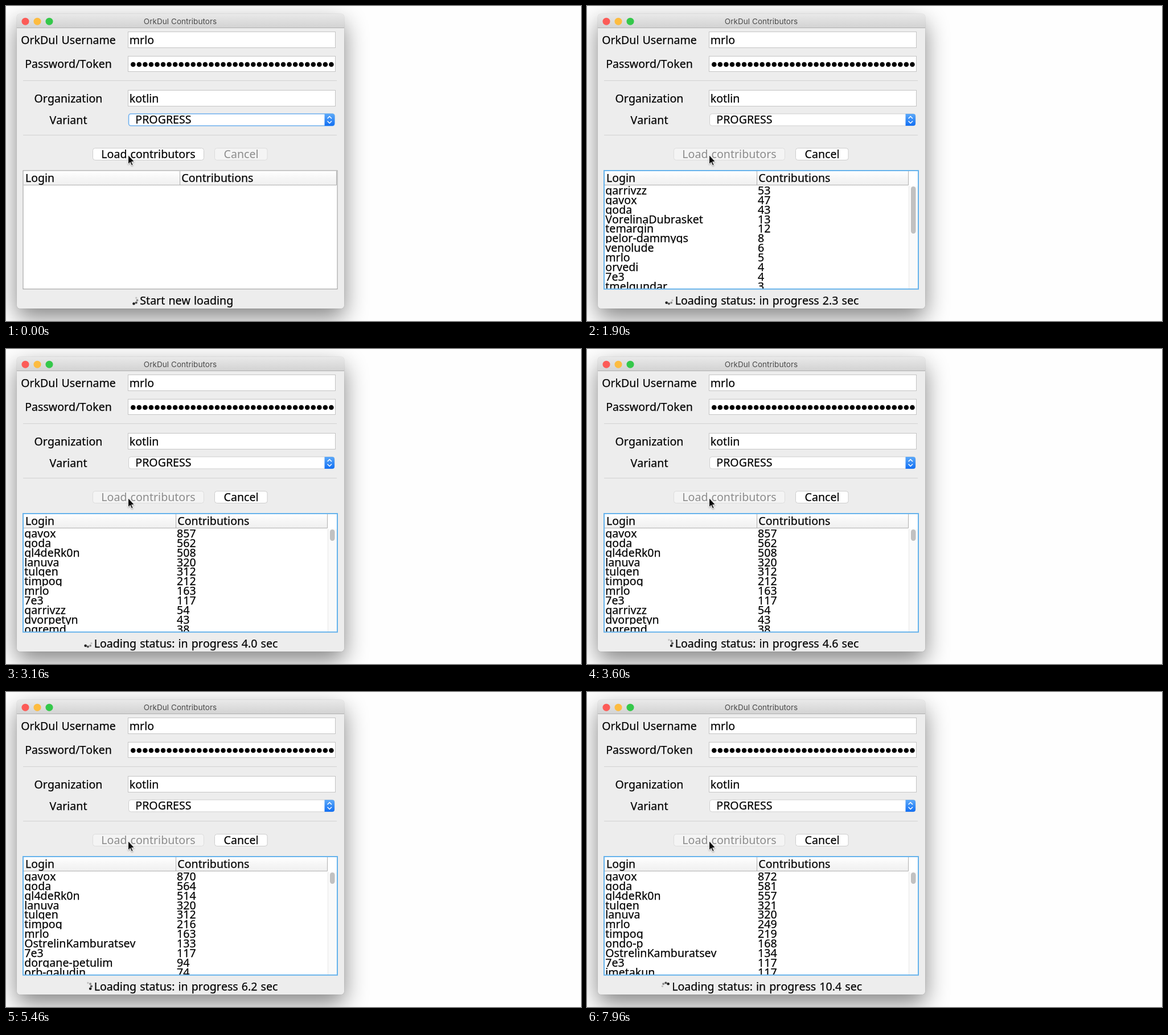
These frames come from a looping animation (1010x555 px, 8000 ms). An HTML page:

```html
<!DOCTYPE html>
<html lang="en">
<head>
<meta charset="utf-8">
<title>Contributors</title>
<style>
  html, body { margin: 0; width: 100%; height: 100%; overflow: hidden; background: #fefefe; }
  .shadow { position: absolute; left: 19px; top: 14px; width: 575px; height: 519px; border-radius: 6px;
    box-shadow: 0 16px 40px rgba(0,0,0,.48), 0 0 1px rgba(0,0,0,.45); }
  #stage { position: absolute; left: 0; top: 0; display: block; }
  text { font: 19.6px "Noto Sans", sans-serif; font-kerning: none; word-spacing: 1px; white-space: pre;
    fill: #050505; stroke: #050505; stroke-width: .25px; }
  .mid { text-anchor: middle; }
  .title { font: 13.6px Inter, sans-serif; word-spacing: 0; fill: #4b4b4b; stroke: none; }
  .field { fill: #fff; stroke: #c4c4c4; }
  .rule { stroke: #d2d2d2; }
  .edge { stroke: #b0b0b0; }
  .btn rect { fill: #fff; stroke: #cdcdcd; }
  .btn.off rect { fill: #f4f4f4; stroke: #dcdcdc; }
  .btn.off text { fill: #8c8c8c; stroke: none; }
  .btn.down rect { fill: url(#press); stroke: #2a70d8; }
  .btn.down text { fill: #fff; stroke: none; }
  .cursor { fill: #0a0a0a; stroke: #fff; filter: drop-shadow(0 1px 1px rgba(0,0,0,.35)); }
</style>
</head>
<body>
<div class="shadow"></div>
<svg id="stage" width="1010" height="555" viewBox="0 0 1010 555">
  <defs>
    <linearGradient id="bar" x2="0" y2="1"><stop stop-color="#e9e9e9"/><stop offset="1" stop-color="#d2d2d2"/></linearGradient>
    <linearGradient id="head" x2="0" y2="1"><stop stop-color="#fff"/><stop offset=".5" stop-color="#f6f6f6"/><stop offset="1" stop-color="#efefef"/></linearGradient>
    <linearGradient id="blue" x2="0" y2="1"><stop stop-color="#5ca9f9"/><stop offset="1" stop-color="#126ff3"/></linearGradient>
    <linearGradient id="press" x2="0" y2="1"><stop stop-color="#4c9bf8"/><stop offset="1" stop-color="#0c62e6"/></linearGradient>
  </defs>

  <rect x="19" y="14" width="575" height="519" rx="6" fill="#ededed"/>
  <path d="M19 39V20a6 6 0 0 1 6-6H588a6 6 0 0 1 6 6V39Z" fill="url(#bar)"/>
  <path class="edge" d="M19 38.5H594"/>
  <circle cx="34" cy="27.2" r="6.5" fill="#fc5b57"/>
  <circle cx="55" cy="27.2" r="6.5" fill="#fdbc40"/>
  <circle cx="76" cy="27.2" r="6.5" fill="#34c84a"/>
  <text class="title mid" x="306" y="32.3">OrkDul Contributors</text>

  <text class="mid" x="109.5" y="67">OrkDul Username</text>
  <text class="mid" x="109.5" y="109.3">Password/Token</text>
  <text class="mid" x="109.5" y="170">Organization</text>
  <text class="mid" x="109.5" y="208">Variant</text>
  <rect class="field" x="214.5" y="45.5" width="364" height="28"/>
  <rect class="field" x="214.5" y="88.5" width="364" height="27"/>
  <rect class="field" x="214.5" y="148.5" width="364" height="28"/>
  <text x="216.8" y="67">mrlo</text>
  <path d="M223.3 103H572" stroke="#000" stroke-width="8.6" stroke-linecap="round" stroke-dasharray="0 10.55"/>
  <text x="216.8" y="170">kotlin</text>
  <path class="rule" d="M30 131.5H581M30 227.5H581"/>

  <rect id="combo" x="215.5" y="190" width="361.5" height="21" rx="4" fill="#fff"/>
  <path d="M559.5 190H573a4 4 0 0 1 4 4V207a4 4 0 0 1-4 4H559.5Z" fill="url(#blue)"/>
  <path d="M564.6 198.3l3.7-3.8 3.7 3.8M564.6 202.7l3.7 3.8 3.7-3.8" fill="none" stroke="#fff" stroke-width="1.5"/>
  <text x="227.3" y="207">PROGRESS</text>

  <g id="load"><rect x="152.5" y="250.5" width="195" height="21" rx="4"/><text class="mid" x="250" y="268.3">Load contributors</text></g>
  <g id="cancel"><rect x="366.5" y="250.5" width="92.5" height="21" rx="4"/><text class="mid" x="413" y="268.3">Cancel</text></g>

  <rect x="30" y="290" width="552" height="208" fill="#fff"/>
  <rect id="header" x="31" y="291" height="25" fill="url(#head)"/>
  <path id="lines" class="edge" fill="none"/>
  <text x="33.9" y="310.3">Login</text>
  <text id="second" y="310.3">Contributions</text>
  <svg id="rows" x="31" y="316.8" width="534" height="181.2"></svg>
  <g id="scroll">
    <rect x="565" y="317" width="16" height="181" fill="#fafafa"/>
    <path d="M565.5 317V498" stroke="#e6e6e6"/>
    <rect id="thumb" x="569" y="318" width="8.5" rx="4.2" fill="#c1c1c1"/>
  </g>
  <rect id="frame" x="30" y="290" width="552" height="208.7" fill="none"/>

  <g id="spin"></g>
  <text id="status" y="525.5"></text>
  <path class="cursor" d="M214.5 262.5V278.8L218.2 275.4 220.8 281.2 223.2 280.1 220.7 274.5H225.6Z"/>
</svg>
<script>
const LOOP = 8000, PRESS = 30, START = 800, FILL = 1690, ROW = 16.87;
const $ = id => document.getElementById(id);

function add(parent, tag, attrs) {
  const el = document.createElementNS('http://www.w3.org/2000/svg', tag);
  return set(parent.appendChild(el), attrs);
}
function set(el, attrs) {
  for (const key in attrs) el.setAttribute(key, attrs[key]);
  return el;
}

// Ranking as it grows while repositories load
const first = 'garrivzz 53 gavox 47 goda 43 VorelinaDubrasket 13 temargin 12 pelor-dammygs 8 venolude 6 mrlo 5 orvedi 4 7e3 4 tmelgundar 3';
const second = 'tulgen 312 mrlo 163 garrivzz 53 gavox 47 goda 46 ogremd 38 VorelinaDubrasket 14 temargin 12 mulpeken 9 pelor-dammygs 8 venolude 6';
const third = 'gavox 857 goda 562 gl4deRk0n 508 lanuva 320 tulgen 312 timpog 212 mrlo 163 7e3 117 garrivzz 54 dvorpetyn 43 ogremd 38';
const fourth = 'gavox 870 goda 564 gl4deRk0n 514 lanuva 320 tulgen 312 timpog 216 mrlo 163 OstrelinKamburatsev 133 7e3 117 dorgane-petulim 94 orb-galudin 74';
const fifth = 'gavox 870 goda 564 gl4deRk0n 554 lanuva 320 tulgen 312 mrlo 249 timpog 219 OstrelinKamburatsev 133 7e3 117 dorgane-petulim 94 orb-galudin 74';
const sixth = 'gavox 872 goda 581 gl4deRk0n 557 tulgen 321 lanuva 320 mrlo 249 timpog 219 ondo-p 168 OstrelinKamburatsev 134 7e3 117 imetakun 117';
// start time, rows, scroll thumb height
const tables = [
  [FILL, first, 83],
  [2200, second, 27],
  [2950, third, 20],
  [3850, third.replace('857', '870'), 20],
  [4600, fourth.replace('514', '508'), 20],
  [5250, fourth, 20],
  [6400, fifth, 20],
  [7300, fifth.replace('870', '872'), 20],
  [7800, sixth, 20],
];

// time, seconds shown, spinner step
const clock = [
  [0, 0, 2], [230, 0, 5], [START, 0, 5], [1900, 2.3, 19], [2460, 3, 27], [3600, 4.6, 41],
  [5460, 6.2, 65], [6960, 8.8, 84], [7960, 10.4, 95], [LOOP, 10.4, 95],
];
function read(t, col) {
  const i = Math.max(1, clock.findIndex(k => k[0] > t));
  const a = clock[i - 1], b = clock[i];
  return a[col] + (b[col] - a[col]) * (t - a[0]) / (b[0] - a[0]);
}

const rows = Array.from({ length: 11 }, (_, i) => {
  const row = add($('rows'), 'svg', { y: i * ROW, width: 534, height: ROW });
  return [1.3, 269].map(x => add(row, 'text', { x, y: 15.2 }));
});
const dots = Array.from({ length: 8 }, () => add($('spin'), 'circle', {}));

function drawSpinner(x, step) {
  dots.forEach((dot, i) => {
    const angle = i * Math.PI / 4, age = (step - i + 8) % 8;
    set(dot, {
      cx: x + 6 * Math.cos(angle), cy: 518.5 + 6 * Math.sin(angle),
      r: 2.3 - age * .2, opacity: Math.max(0, .9 - age * .24),
    });
  });
}

function drawTable(t) {
  const table = tables.filter(s => s[0] <= t).pop();
  const full = !!table, split = full ? 298.5 : 305.5, right = full ? 564.5 : 580.5;
  const cells = full ? table[1].split(' ') : [];
  rows.forEach((row, i) => row.forEach((cell, j) => cell.textContent = cells[2 * i + j] || ''));
  set($('header'), { width: right - 31 });
  set($('lines'), { d: `M31 315.5H${right}V291M${split} 291V315` });
  set($('second'), { x: split + 2.8 });
  set($('scroll'), { visibility: full ? 'visible' : 'hidden' });
  if (full) set($('thumb'), { height: table[2] });
}

function draw(t) {
  const busy = t >= START;
  const sec = (Math.floor(read(t, 1) * 10 + .3) / 10).toFixed(1);
  const x = !busy ? 235.3 : sec >= 10 ? 149.2 : 154.7;
  $('status').textContent = busy ? `Loading status: in progress ${sec} sec` : 'Start new loading';
  set($('status'), { x });
  drawSpinner(x - 10.8, Math.floor(read(t, 2) + .2) % 8);
  set($('load'), { class: 'btn' + (busy ? ' off' : t >= PRESS ? ' down' : '') });
  set($('cancel'), { class: busy ? 'btn' : 'btn off' });
  set($('combo'), { stroke: busy ? '#cfcfcf' : '#6fb0ee', 'stroke-width': busy ? 1 : 1.6 });
  set($('frame'), { stroke: busy ? '#66b3ec' : '#9a9a9a', 'stroke-width': busy ? 2 : 1 });
  drawTable(t);
}

const begin = performance.now();
function tick() {
  draw((performance.now() - begin) % LOOP);
  requestAnimationFrame(tick);
}
tick();
</script>
</body>
</html>
```
